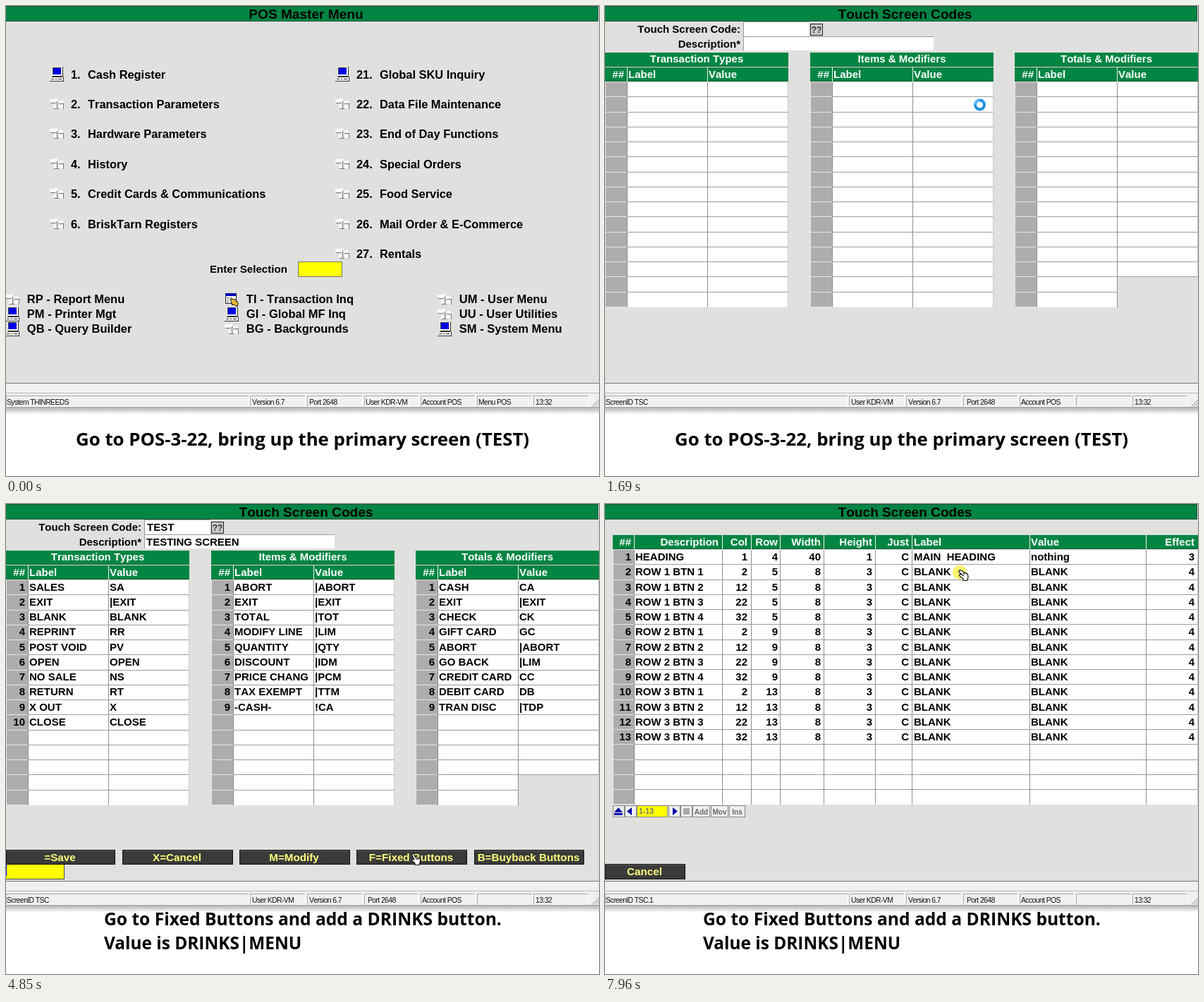
These frames come from a looping animation (841 px wide and 666 px high, 8000 ms). An HTML page:

```html
<!DOCTYPE html>
<html lang="en">
<head>
<meta charset="utf-8">
<title>POS touch screen walkthrough</title>
<style>
html, body { margin: 0; width: 100%; height: 100%; overflow: hidden; background: #fff; }
svg { display: block; width: 841px; height: 666px; }
text { font-family: "Liberation Sans", Arial, sans-serif; font-weight: bold; font-kerning: none; white-space: pre; }
text.small { font-weight: normal; letter-spacing: -.6px; }
text.caption { font-family: "Open Sans", "Noto Sans", sans-serif; font-kerning: auto; }
rect, .crisp { shape-rendering: crispEdges; }
</style>
</head>
<body>
<svg id="stage" viewBox="0 0 841 666">
  <defs>
    <linearGradient id="shade" x2="0" y2="1">
      <stop offset="0" stop-color="#b4b4b4"/><stop offset="1" stop-color="#fff"/>
    </linearGradient>
    <g id="pc" class="crisp">
      <path d="M3 0h15v13H3z" fill="#f4f4f4"/>
      <path d="M5 2h11v9H5z" fill="#0000e8"/>
      <path d="M4.500 11V1.500H16M18.500 0v13.500H4" fill="none" stroke="#333"/>
      <path d="M0 15h19v5H0z" fill="#f0f0f0"/>
      <path d="M3 14.500h15M0 20.500h19.500V14M2 17.500h4m2 0h2m2 0h5" fill="none" stroke="#333"/>
    </g>
    <g id="tree" class="crisp">
      <path d="M0 4h7v5H0zM13 6h6v4h-6zM7 3h4v5H7zM5 12h5v5H5zM13 12h6v5h-6z" fill="#fafafa"/>
      <path d="M1 9.500h7M10.500 7v10M13 10.500h6.500v7M6 17.500h7" fill="none" stroke="#777"/>
    </g>
    <g id="inq" class="crisp">
      <path d="M1 2h15v14H1z" fill="#fff" stroke="#222"/>
      <path d="M1 2h15v4H1z" fill="#0000b8"/>
      <path d="M3 8.500h3m2 0h3m-8 3h3m2 0h3m-8 3h3" stroke="#555"/>
      <path d="M8 10l7 1 5 6-3 4-3-3-3 1z" fill="#e3b436" stroke="#222"/>
    </g>
    <g id="point" fill="#fff" stroke="#111" stroke-width="1.200" stroke-linejoin="round">
      <path d="M-5.500-6.500Q-7-5-5.500-3.800L-2-.5-4.800-.8Q-6.500.5-4.500 2L0 5.500V8H5.500L7 3.500Q7-1 4.500-2.500L1-4-3.800-6.800Q-4.600-7.200-5.500-6.500Z"/>
      <path d="M-2-.5 1 1.500M0-3l2 2m1-2 1.500 1.500" fill="none"/>
    </g>
    <g id="press" fill="#fff" stroke="#111" stroke-width="1.100" stroke-linejoin="round">
      <path d="M-4-7.500Q-5.700-6.800-5-5L-2 1-4 .2Q-6 1-4.500 3L-1 6V8.500H5L6.500 3Q6.500-1 4-1.500L-.5-2-2.500-6.500Q-3-7.800-4-7.500Z"/>
      <path d="M1-1.500V1m2.300-2V1" fill="none"/>
    </g>
    <g id="fist" fill="#fff" stroke="#111" stroke-width="1.200" stroke-linejoin="round">
      <path d="M-5-7 3-6Q6-4 6 1 5 7 0 7.500L-4 6-3 3-6 1-4-1-6-3-3-4Z"/>
      <path d="M-3-4H1Q3-3 2-1H-4M-3 3H1Q3 2 2 0" fill="none"/>
    </g>
    <g id="busy" fill="none">
      <circle r="6.500" stroke="#d8efff" stroke-width="5"/>
      <circle r="6.500" stroke="#1f8fe0" stroke-width="3.800"/>
      <path d="M-6.500 0A6.500 6.500 0 0 1 0-6.500" stroke="#5dbcf5" stroke-width="3"/>
    </g>
  </defs>
</svg>
<script>
const LOOP = 8000, ROW = 21.25, GREEN = '#008543', YELLOW = '#ffff00';
const stage = document.getElementById('stage');
const timed = [];
let layer = stage;

function add(tag, attrs, parent = layer) {
  const node = document.createElementNS('http://www.w3.org/2000/svg', tag);
  for (const k in attrs) node.setAttribute(k, attrs[k]);
  return parent.appendChild(node);
}
// Everything drawn after this call is visible from `from` until `to`.
function during(from, to) {
  layer = add('g', {}, stage);
  timed.push({ node: layer, from, to });
}
const box = (x, y, width, height, fill, more) => add('rect', { x, y, width, height, fill, ...more });
const line = (d, stroke, more) => add('path', { d, stroke, fill: 'none', class: 'crisp', ...more });
const icon = (id, x, y) => add('use', { href: '#' + id, x, y: Math.round(y) });
// Baselines sit on whole pixels.
function text(s, x, y, size = 15, fill = '#000', anchor = 'start', cls = '') {
  const node = add('text', { x, y: Math.round(y), 'font-size': size, fill, 'text-anchor': anchor, class: cls });
  node.textContent = s;
  return node;
}
const right = (s, x, y, fill) => text(s, x, y, 15, fill, 'end');
const title = s => text(s, 425.5, 18, 19.1, '#000', 'middle');
const caret = (x, y, from, to, color = '#00f') => { during(from, to); box(x, y, 1, 16, color); };

function status(parts, xs = [1, 349, 430, 510, 590, 670, 751]) {
  parts.forEach((s, i) => text(s, xs[i], 565, 10.4, '#111', 'start', 'small'));
}
function button(s, x, y, w, h = 21) {
  box(x + .5, y + .5, w - 1, h - 1, '#3a3a3a', { stroke: '#111' });
  line(`M${x + 1} ${y + 1.5}h${w - 2}`, '#5c5c5c');
  text(s, x + w / 2 - 1, y + h / 2 + 5, 15.2, '#ffff80', 'middle');
}
function field(x, y, w, h, fill) {
  box(x, y, w, h, fill);
  line(`M${x + .5} ${y + h}V${y + .5}H${x + w}`, '#999');
}
function menu(items, x, first, pad) {
  items.forEach((s, i) => {
    const y = 102.5 + 42.45 * i, kind = s[0] === '*' ? 'pc' : 'tree';
    icon(kind, x, y - 17);
    text(first + i + '.', x + 30, y, 16.4);
    text(s.replace('*', ''), x + pad, y, 16.4);
  });
}
// xs: column edges; the first column holds the row numbers.
function grid(xs, y, n) {
  const end = xs[xs.length - 1], h = n * ROW;
  box(xs[0], y, xs[1] - xs[0], h, '#adadad');
  box(xs[1], y, end - xs[1], h, '#fff');
  for (let i = 1; i <= n; i++) {
    const b = Math.round(y + i * ROW) - .5;
    line(`M${xs[0]} ${b}H${xs[1]}`, '#e6e6e6');
    if (i < n) line(`M${xs[1]} ${b}H${end}`, '#9c9c9c', { 'stroke-width': 1.5 });
  }
  xs.slice(1, -1).forEach(x => line(`M${x - .5} ${y}v${h}`, '#8e8e8e'));
  line(`M${xs[0] + .5} ${y}v${h}`, '#e6e6e6');
  line(`M${end - .5} ${y}v${h}`, '#ccc');
}
function header(xs, y) {
  const x = xs[0], end = xs[xs.length - 1];
  box(x, y, end - x, 20, GREEN);
  line(`M${x} ${y + 19.5}H${end}`, '#00602f');
  xs.slice(1, -1).forEach(c => line(`M${c - .5} ${y}v20`, '#e8f4ec'));
}

// Window frame
box(0, 0, 841, 568, '#e0e0df');
box(0, 0, 840, 22, GREEN);
line('M0 .5H839.500V21.500H0', '#1d5138');
box(0, 535, 841, 34, '#f0f0f0');
line('M0 534.500H841', '#777');
line('M0 548.500H841', '#bbb');
for (const [x, end] of [[0, 344], [346, 424], [427, 505], [508, 585], [588, 665], [668, 746], [748, 826]]) {
  line(`M${x + .5} 567V552.500H${end}`, '#aaa');
  line(`M${x} 567.500H${end + .5}V552`, '#fff');
}
add('path', { d: 'M832 567l9-9m-5 9 5-5m-1 5 1-1', stroke: '#888' });
box(0, 569, 841, 10, 'url(#shade)');
line('M0 568.500H841', '#a2a2a2');

// Captions
during(0, 3920);
text('Go to POS-3-22, bring up the primary screen (TEST)', 99, 623, 25.82, '#000', 'start', 'caption');
during(3920, LOOP);
text('Go to Fixed Buttons and add a DRINKS button.', 139, 597, 24.6, '#000', 'start', 'caption');
text('Value is DRINKS|MENU', 139, 631, 24.4, '#000', 'start', 'caption');

// Parts shared by both menus
during(0, 1690);
text('Enter Selection', 289, 378, 15.1);
[
  [-1, 'tree:RP - Report Menu', 'pc:PM - Printer Mgt', 'pc:QB - Query Builder'],
  [310, 'inq:TI - Transaction Inq', 'pc:GI - Global MF Inq', 'tree:BG - Backgrounds'],
  [612, 'tree:UM - User Menu', 'tree:UU - User Utilities', 'pc:SM - System Menu']
].forEach(([x, ...rows]) => rows.forEach((s, i) => {
  const [kind, label] = s.split(':'), y = 421 + 21.2 * i;
  icon(kind, x, y - 16);
  text(label, x + 30.8, y, 16.5);
}));
status(['System THINREEDS', 'Version 6.7', 'Port 2648', 'User KDR-VM', 'Account POS', '', '13:32']);

during(0, 1540);
box(414.5, 362.5, 62, 21, YELLOW, { stroke: '#777' });

during(0, 390);
title('POS Master Menu');
menu(['*Cash Register', 'Transaction Parameters', 'Hardware Parameters', 'History',
  'Credit Cards & Communications', 'BriskTarn Registers'], 62, 1, 54);
menu(['*Global SKU Inquiry', 'Data File Maintenance', 'End of Day Functions', 'Special Orders',
  'Food Service', 'Mail Order & E-Commerce', 'Rentals'], 467, 21, 63);
status(['', '', '', '', '', 'Menu POS']);
caret(415, 363, 50, 150);
during(150, 390);
text('3', 416, 376, 13.5);
caret(424, 363, 190, 240);

during(390, 1690);
title('Hardware Parameters Menu');
button('<-Back', 0, 22, 73, 22);
menu(['*Register Parameters', '*Hardware Configuration Codes', '*Receipt Header', '*Receipt Trailer',
  '*Gift Receipts'], 31, 1, 54);
menu(['*Function Key Definitions', '*Touch Screen Codes'], 457, 21, 63);
status(['', '', '', '', '', 'Menu POS-03']);
caret(415, 363, 490, 840);

// Touch screen code form
const tables = [
  [0, 'Transaction Types', 'SALES:SA,EXIT:|EXIT,BLANK:BLANK,REPRINT:RR,POST VOID:PV,OPEN:OPEN,NO SALE:NS,RETURN:RT,X OUT:X,CLOSE:CLOSE'],
  [291, 'Items & Modifiers', 'ABORT:|ABORT,EXIT:|EXIT,TOTAL:|TOT,MODIFY LINE:|LIM,QUANTITY:|QTY,DISCOUNT:|IDM,PRICE CHANG:|PCM,TAX EXEMPT:|TTM,-CASH-:!CA'],
  [581, 'Totals & Modifiers', 'CASH:CA,EXIT:|EXIT,CHECK:CK,GIFT CARD:GC,ABORT:|ABORT,GO BACK:|LIM,CREDIT CARD:CC,DEBIT CARD:DB,TRAN DISC:|TDP']
];
during(1690, LOOP);
title('Touch Screen Codes');
const formXs = [1, 349, 430, 513, 590, 670, 751];
status(['', 'User KDR-VM', 'Version 6.7', 'Port 2648', 'Account POS', '', '13:32'], formXs);

during(1690, 5150);
status(['ScreenID TSC']);
right('Touch Screen Code:', 192, 38);
right('Description*', 192, 59);
field(196, 22, 93, 21, '#fff');
field(196, 43, 270, 20, '#fff');
box(291.5, 25.5, 17, 16, '#c8c8c8', { stroke: '#222' });
text('??', 300, 38, 12, '#333', 'middle');
for (const [x, name] of tables) {
  const xs = [x, x + 32, x + 146, x + 260];
  header([x, x + 260], 66);
  header(xs, 87);
  text(name, x + 130, 80, 15, '#fff', 'middle');
  right('##', x + 27, 102, '#fff');
  text('Label', x + 33, 102, 15, '#fff');
  text('Value', x + 147, 102, 15, '#fff');
  grid(xs, 108, 15);
}
box(727, 384, 114, 43, '#e0e0df');

during(1740, 3450);
field(196, 22, 93, 21, YELLOW);
const typed = text('', 198, 36, 13.5);
during(1740, 3770);
button('Cancel', 0, 510, 114, 22);
caret(197, 23, 1740, 2110);
caret(214, 23, 2260, 2580);
caret(223, 23, 2580, 2800);
caret(232, 23, 2800, 3280);

during(3450, 5150);
text('TEST', 200, 38);

during(3770, 5150);
text('TESTING SCREEN', 199, 59);
for (const [x, , rows] of tables) rows.split(',').forEach((s, i) => {
  const y = 122.6 + ROW * i, [label, value] = s.split(':');
  right(i + 1, x + 27, y);
  text(label, x + 33, y);
  text(value, x + 147, y);
});
during(3850, 5080);
[['=Save', 0, 155], ['X=Cancel', 165, 157], ['M=Modify', 331, 157], ['F=Fixed Buttons', 497, 157], ['B=Buyback Buttons', 664, 156]]
  .forEach(([s, x, w]) => button(s, x, 490, w));
box(0, 511, 82, 20, YELLOW);
line('M0 531.500H82.500V511', '#444');
caret(0, 511, 3850, 4320);
caret(0, 511, 4850, 5080);

// Fixed buttons table
const cols = [11, 42, 167, 208, 249, 311, 384, 436, 603, 768, 841];
const ends = [37, 161, 202, 245, 306, 379, 431];
during(5150, LOOP);
status(['ScreenID TSC.1']);
header(cols, 44);
['##', 'Description', 'Col', 'Row', 'Width', 'Height', 'Just'].forEach((s, i) => right(s, ends[i], 59, '#fff'));
text('Label', 438, 59, 15, '#fff');
text('Value', 604, 59, 15, '#fff');
right('Effect', 836, 59, '#fff');
grid(cols, 65, 17);

during(5230, LOOP);
for (let i = 0; i < 13; i++) {
  const y = 80.2 + ROW * i, k = i - 1, r = k >> 2, c = k % 4;
  const row = i
    ? [`ROW ${r + 1} BTN ${c + 1}`, 2 + 10 * c, 5 + 4 * r, 8, 3, 'BLANK', 'BLANK', 4]
    : ['HEADING', 1, 4, 40, 1, 'MAIN  HEADING', 'nothing', 3];
  right(i + 1, 37, y);
  text(row[0], 43, y);
  row.slice(1, 5).forEach((s, j) => right(s, ends[j + 2], y));
  right('C', 431, y);
  text(row[5], 438, y);
  text(row[6], 604, y);
  right(row[7], 836, y);
}
const navs = [[11, 17], [28, 17], [45, 44], [90, 17], [107, 17], [124, 25], [150, 25], [176, 23]];
navs.forEach(([x, w], i) => box(x + .5, 427.5, w - 1, 16, i === 2 ? YELLOW : '#eee', { stroke: '#888' }));
add('path', { d: 'M13 437l6-7 6 7zM13 438h12v3H13zM38 430v11l-7-5.500zM96 430v11l7-5.500z', fill: '#0000a8' });
box(111, 431, 9, 9, '#aaa');
text('1-13', 48, 439, 10.5, '#777');
['Add', 'Mov', 'Ins'].forEach((s, i) => text(s, [136.5, 162.5, 187.5][i], 440, 10, '#666', 'middle'));
button('Cancel', 0, 510, 114, 22);

during(5310, 7960);
box(41, 64, 125, 22, YELLOW);
line('M41 85.500H165.500V64', '#555');
box(41, 65, 63, 16, '#1877d4');
text('HEADING', 42, 78, 13.4, '#fff');
caret(103, 65, 5310, 5860, '#e78b2d');
caret(103, 65, 6390, 6960, '#e78b2d');
caret(103, 65, 7430, 7960, '#e78b2d');

during(7960, LOOP);
add('circle', { cx: 503, cy: 97, r: 10, fill: '#f8ee2a', opacity: .7 });

// Pointer: shape changes, then moves as [start, end, x, y] reached by `end`
const poses = [[0, ''], [1140, 'point'], [1540, 'busy'], [1740, 'fist'], [1960, 'point'], [2110, ''],
  [2800, 'point'], [3450, 'fist'], [3770, 'point'], [4700, 'press'], [5080, 'fist'], [6090, 'point'],
  [6710, 'fist'], [6790, 'point']];
const moves = [[0, 0, 690, 400], [1140, 1500, 537, 142], [4220, 4700, 581, 503], [6090, 6560, 494, 114.5], [7110, 7260, 508, 100.5]];
const letters = [[0, ''], [2110, 'T'], [2260, 'TE'], [2580, 'TES'], [2800, 'TEST']];
const pointer = add('use', {}, stage);
const at = (steps, t) => steps.filter(s => s[0] <= t).pop()[1];

function place(t) {
  let [, , x, y] = moves[0];
  for (const [a, b, tx, ty] of moves.slice(1)) {
    const p = Math.min(1, Math.max(0, (t - a) / (b - a))), e = p * p * (3 - 2 * p);
    x += (tx - x) * e;
    y += (ty - y) * e;
  }
  return [x, y];
}
function draw(t) {
  for (const { node, from, to } of timed) node.style.display = t >= from && t < to ? '' : 'none';
  typed.textContent = at(letters, t);
  const pose = at(poses, t);
  const [x, y] = pose === 'busy' ? [531.5, 140] : place(t);
  pointer.style.display = pose ? '' : 'none';
  pointer.setAttribute('href', '#' + pose);
  pointer.setAttribute('transform', `translate(${x} ${y})`);
}
const start = performance.now();
function tick() {
  draw((performance.now() - start) % LOOP);
  requestAnimationFrame(tick);
}
tick();
</script>
</body>
</html>
```
